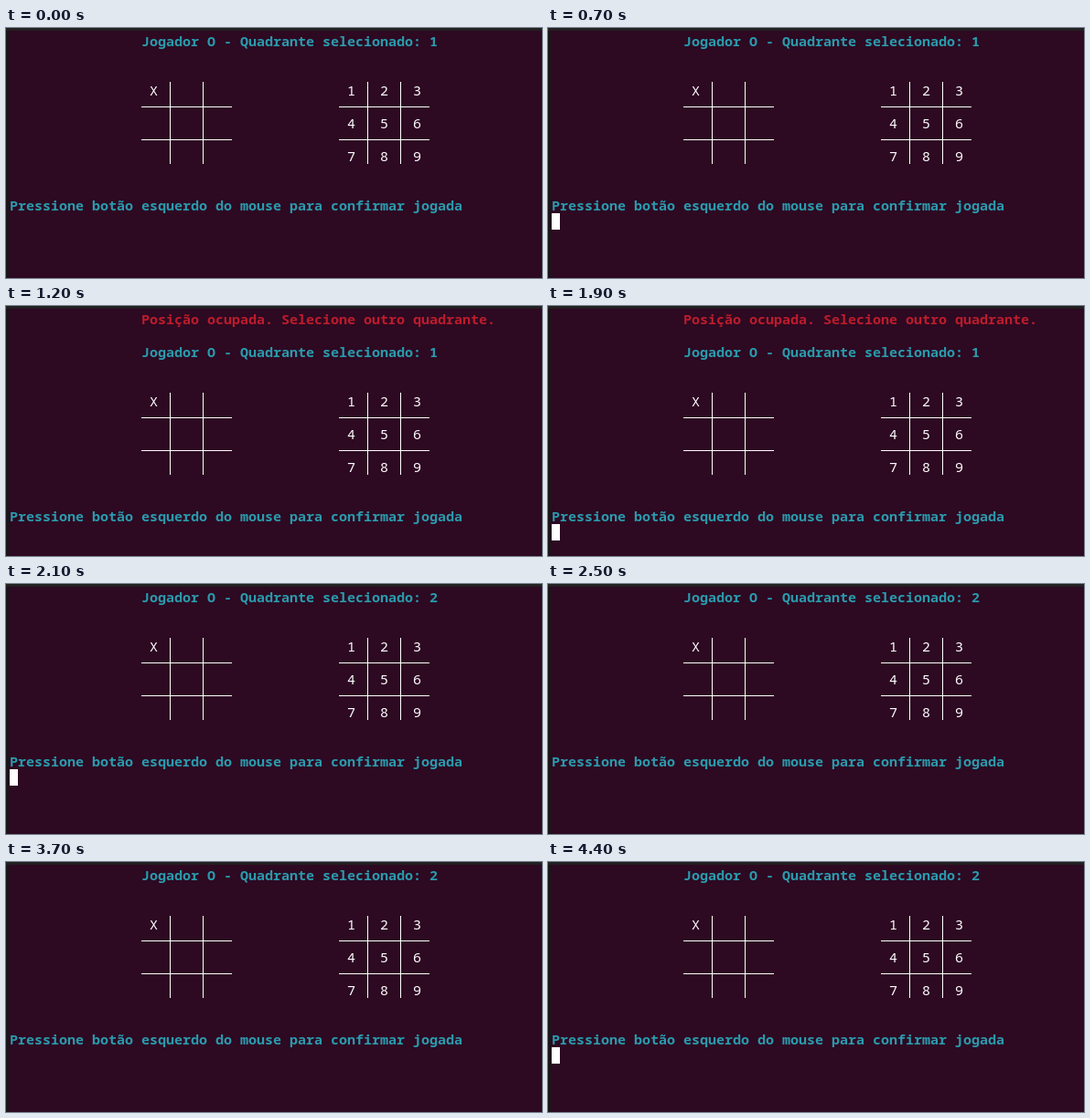
An HTML page for the animation above (4800 ms loop, 586 by 274 pixels).

```html
<!DOCTYPE html>
<html lang="pt">
<head>
<meta charset="utf-8">
<title>Jogo da velha</title>
<style>
  html, body { margin: 0; width: 100%; height: 100%; overflow: hidden; background: #2d0922; }
  svg { display: block; }
  text { font: 15px "Noto Sans Mono", "DejaVu Sans Mono", monospace; fill: #fff; white-space: pre; }
  .info { font-weight: bold; fill: #2a9bad; }
  .error { font-weight: bold; fill: #bd1c2c; }
  rect { shape-rendering: crispEdges; fill: #fff; }
</style>
</head>
<body>
<svg width="586" height="274">
  <rect width="586" height="274" style="fill:#2d0922"/>
  <rect width="3" height="274" style="fill:#191519"/>
  <rect width="586" height="3" style="fill:#222121"/>
  <g id="error"></g>
  <g id="game"></g>
</svg>
<script>
const LOOP = 4800, CELL = 9, ROW = 18, LEFT = 4, TOP = 5;
const ERROR_ON = 800, MOVE = 2100;
const CURSOR_ON = [[600, 1200], [1800, 2400], [3000, 3700], [4300, LOOP]];

const error = document.getElementById('error');
const game = document.getElementById('game');

function add(parent, tag, attrs, content = '') {
  const el = document.createElementNS('http://www.w3.org/2000/svg', tag);
  for (const key in attrs) el.setAttribute(key, attrs[key]);
  el.textContent = content;
  return parent.appendChild(el);
}

const x = col => LEFT + col * CELL;
const y = row => TOP + row * ROW;
const box = (left, top, width, height) => add(game, 'rect', { x: left, y: top, width, height });
const write = (parent, col, row, content, style = '') =>
  add(parent, 'text', { x: x(col), y: y(row) + 15, class: style }, content);

function board(col, marks) {
  for (const i of [0, 1]) {
    box(x(col + 3 + 4 * i) + 4, y(3), 1, 5 * ROW);
    box(x(col), y(4 + 2 * i) + 9, 11 * CELL, 1);
  }
  [...marks].forEach((mark, i) =>
    write(game, col + 1 + 4 * (i % 3), 3 + 2 * Math.floor(i / 3), mark));
}

write(error, 16, 0, 'Posição ocupada. Selecione outro quadrante.', 'error');
const status = write(game, 16, 0, '', 'info');
board(16, 'X');
board(40, '123456789');
write(game, 0, 10, 'Pressione botão esquerdo do mouse para confirmar jogada', 'info');
const cursor = box(x(0), y(11), CELL, ROW);

const show = (el, on) => el.setAttribute('visibility', on ? 'visible' : 'hidden');

function draw(now) {
  const t = now % LOOP;
  const occupied = t >= ERROR_ON && t < MOVE;
  show(error, occupied);
  show(cursor, CURSOR_ON.some(([from, to]) => t >= from && t < to));
  game.setAttribute('transform', `translate(0 ${occupied ? 2 * ROW : 0})`);
  status.textContent = `Jogador O - Quadrante selecionado: ${t < MOVE ? 1 : 2}`;
  requestAnimationFrame(draw);
}
draw(0);
</script>
</body>
</html>
```
